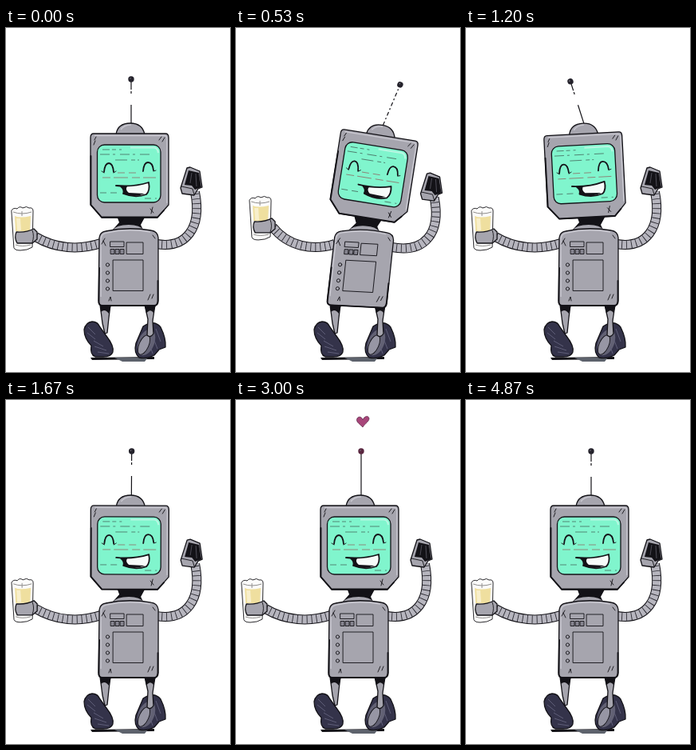
Write an HTML page that moves like this. It is 281x430 px and loops after 4.94 s.

```html
<!DOCTYPE html>
<html lang="en">
<head>
<meta charset="utf-8">
<title>Dancing robot</title>
<style>
@property --lean { syntax: "<number>"; inherits: true; initial-value: 0; }
@property --nod { syntax: "<number>"; inherits: true; initial-value: 0; }
@property --whip { syntax: "<number>"; inherits: true; initial-value: 0; }

html, body { margin: 0; width: 100%; height: 100%; overflow: hidden; background: #fff; }
svg {
  display: block; width: 100%; height: 100%;
  --ink: #131217; --metal: #a6a5ae; --light: #c9c8d0; --shade: #85848f; --navy: #34334a;
  animation: lean 4940ms ease-in-out infinite, nod 4940ms ease-in-out infinite, whip 4940ms ease-in-out infinite;
}
.ink { stroke: var(--ink); stroke-width: 1.3; stroke-linejoin: round; stroke-linecap: round; }
.metal { fill: var(--metal); }
.shade { fill: var(--shade); }
.black { fill: var(--ink); }
.line { fill: none; }
.thin { stroke-width: .9; }
.bold { stroke-width: 1.8; }
.glint { fill: none; stroke: var(--light); stroke-width: 1.4; }

.body {
  transform-origin: 152px 325px;
  transform: translateY(calc(var(--lean) * 1px)) rotate(calc(var(--lean) * 3deg)) skewX(calc(var(--lean) * -3deg));
}
.head {
  transform-origin: 155px 294px;
  transform: rotate(calc(var(--lean) * 9deg + var(--nod) * -3deg));
}
.antenna {
  transform-origin: 157px 119px;
  transform: rotate(calc(var(--whip) * 14deg));
}
.glass { transform: translate(calc(var(--lean) * 10px), calc(var(--lean) * -13px)); }
.fist { transform: translate(calc(var(--lean) * 12.5px), calc(var(--lean) * 7px)); }

.arm path { fill: none; }
.arm path:nth-child(1) { stroke: var(--ink); stroke-width: 12; }
.arm path:nth-child(2) { stroke: #b6b5be; stroke-width: 10; }
.arm path:nth-child(3) { stroke: #2b2a32; stroke-width: 10; stroke-dasharray: .9 5.1; }
.left path { d: path("M119 269C92 278 62 276 37 261"); animation: left 4940ms ease-in-out infinite; }
.right path { d: path("M189 270C226 276 246 250 237 205"); animation: right 4940ms ease-in-out infinite; }

.wire { stroke-width: 1.2; animation: wire 4940ms step-end infinite; }
.bulb { fill: #24222b; animation: bulb 4940ms linear infinite; }
.heart { opacity: 0; animation: rise 4940ms linear infinite; }

@keyframes lean {
  0%, 22.3%, 33%, 44.5%, 100% { --lean: 0; }
  9.3% { --lean: 1.03; }
  43%, 44.49% { --lean: 1; }
}
@keyframes nod {
  0%, 15%, 33%, 100% { --nod: 0; }
  23.5%, 25% { --nod: 1; }
}
@keyframes whip {
  0%, 33%, 44.5%, 100% { --whip: 0; }
  10.2%, 43%, 44.49% { --whip: 1; }
  24.3% { --whip: -1.06; }
}
@keyframes left {
  0%, 22.3%, 33%, 44.5%, 100% { d: path("M119 269C92 278 62 276 37 261"); }
  9.3%, 43%, 44.49% { d: path("M124 270C97 279 65 273 46 248"); }
}
@keyframes right {
  0%, 22.3%, 33%, 44.5%, 100% { d: path("M189 270C226 276 246 250 237 205"); }
  9.3%, 43%, 44.49% { d: path("M195 274C236 282 258 258 249 212"); }
}
@keyframes wire {
  0%, 72% { stroke-dasharray: 23 14 3 2 10; }
  5% { stroke-dasharray: 5 3 2 3; }
  17%, 44.5% { stroke-dasharray: 24 14 3 2 10; }
  50% { stroke-dasharray: none; }
}
@keyframes bulb {
  0%, 47%, 73%, 100% { fill: #24222b; }
  50%, 70% { fill: #59263f; }
}
@keyframes rise {
  0%, 47% { opacity: 0; transform: translate(157px, 63px) scale(.1); }
  50% { opacity: 1; transform: translate(157px, 51px) scale(.6); }
  54% { opacity: 1; transform: translate(158px, 39px) scale(.9); }
  60.7% { opacity: 1; transform: translate(159px, 27px) scale(1); }
  68% { opacity: .9; transform: translate(159px, 15px) scale(1); }
  72.5%, 100% { opacity: 0; transform: translate(159px, 8px) scale(1); }
}
</style>
</head>
<body>
<svg viewBox="0 0 281 430" preserveAspectRatio="none">
  <g class="feet">
    <path class="black" d="M106 412L186 411V414L108 415Z"/>
    <path d="M136 412H178L174 417H146Z" fill="#5d626c"/>
    <path class="ink" fill="var(--navy)" d="M98 377Q100 368 108 367Q115 367 118 374L126 385Q136 398 134 405Q132 411 122 411H112Q105 408 107 397Q98 388 98 377Z"/>
    <path class="line" stroke="#5f5e78" d="M103 374L112 383M102 381L112 389M110 391L122 398M111 398L126 403M115 405L129 407"/>
    <path class="ink" fill="var(--navy)" d="M172 373Q186 364 194 374Q201 388 200 399L192 402L186 409Q177 414 167 412Q160 406 163 394Z"/>
    <ellipse cx="176" cy="393" rx="10" ry="17" transform="rotate(22 176 393)" fill="#626174"/>
    <ellipse class="ink thin" cx="173" cy="396" rx="6" ry="13" transform="rotate(24 173 396)" fill="#9796a4"/>
    <path class="line" stroke="#5f5e78" d="M188 376L194 392M185 388L190 401M181 398L184 407"/>
    <path class="ink metal" d="M118 346L121 369L124 382L127 381L129 362L131 346Z"/>
    <path class="ink metal" d="M174 346L178 364L177 384Q181 388 185 382L184 366L187 346Z"/>
    <path class="black" d="M118 346H132L129 357Q124 350 119 355ZM174 346H188L185 356Q181 350 176 357Z"/>
  </g>

  <g class="arm left"><path/><path/><path/></g>
  <g class="arm right"><path/><path/><path/></g>

  <g class="body">
    <path class="black" d="M139 235H175L169 246L172 252H134L142 243Z"/>
    <path class="metal" d="M134 253Q138 246 154 246Q168 246 173 253Z"/>
    <path class="ink metal" d="M117 262Q118 255 125 254Q153 248 182 253Q190 254 191 262V341Q191 347 186 347H121Q116 347 116 341Z"/>
    <path class="glint" d="M119 336V263Q120 257 126 256Q153 250 181 255"/>
    <path class="ink bold line" d="M117 300L116.500 341Q116 347 121 347H186Q190 347 190.500 341V316"/>
    <g class="ink thin line">
      <rect x="131" y="267" width="17" height="6.500"/>
      <rect x="151.500" y="268" width="20.500" height="14.500"/>
      <path d="M131.500 276.500h4.500v6h-4.500zM137.500 276.500h4.500v6h-4.500zM143.500 276.500h4.500v6h-4.500z" class="shade"/>
      <rect x="134.500" y="290" width="37.500" height="38.500"/>
      <circle cx="127.500" cy="296" r="2.100"/>
      <circle cx="127.500" cy="306" r="2.100"/>
      <circle cx="127.500" cy="316" r="2.100"/>
      <circle cx="127.500" cy="326" r="2.100"/>
      <path d="M120 270L124 263M122 266L125 272M129 341L131 336L132 341M178 340L181 333M183 338L185 333M184 259L187 263"/>
    </g>
  </g>

  <g class="glass">
    <path class="ink thin" fill="#fbfbfa" d="M7 228Q9 224 14 226Q17 222 21 225Q26 222 29 225Q34 224 34 229L33 274Q27 278 18 278Q11 278 10 275Z"/>
    <path fill="#efdf9f" d="M11 235Q17 238 31 235L30 254H12Z"/>
    <path fill="#f8efcc" d="M13 238H18L19 253H14Z"/>
    <path class="line" stroke="#8f8d8c" d="M9 230Q20 234 32 230M20 229V235M12 271Q20 274 31 271"/>
    <path class="ink metal" d="M13 255Q25 256 35 251L39 255V264L33 269H14Q10 262 13 255Z"/>
    <path class="ink thin line" d="M33 253Q36 260 33 268"/>
  </g>

  <g class="fist">
    <path class="ink metal" d="M227 175L231 174L243 179L246 199L241 201L236 209L221 207L219 200Z"/>
    <path class="black" d="M229 178L242 181L245 199L237 202L233 197L224 196Z"/>
    <path class="line" stroke="#5c5b66" stroke-width=".8" d="M233 181L231 194M238 182L239 198"/>
    <path class="ink thin line" d="M220 198L234 201L236 208"/>
  </g>

  <g class="head">
    <g class="antenna">
      <path class="wire ink line" style="stroke-linecap:butt" d="M157 119V66"/>
      <circle class="bulb" cx="157" cy="64" r="3.700"/>
      <circle cx="156" cy="63" r=".8" fill="#77757f"/>
    </g>
    <path class="ink metal" d="M138 133Q140 119 156 119Q171 119 174 133Z"/>
    <path class="glint" d="M144 127Q148 121 157 121"/>
    <path class="ink metal" d="M110 132H200Q204 132 204 137V221L190 237H120L106 221V137Q106 132 110 132Z"/>
    <path class="glint" d="M111 134.500H199Q202 135 202 139V219"/>
    <path class="ink bold line" d="M106.500 160V221L120 236.500H190L198 228"/>
    <rect class="ink" x="114.500" y="146" width="79.500" height="72" rx="9" fill="#80f5cd"/>
    <path class="line" stroke="#b9f8e3" stroke-width="2" d="M156 149.500H186Q190 150 191 156"/>
    <g fill="none" stroke="#466a5e" stroke-width=".8">
      <path stroke-dasharray="9 3 5 4" d="M121 152H145"/>
      <path stroke-dasharray="12 4 3 6" d="M118 158H184"/>
      <path stroke-dasharray="15 5 5 3" d="M137 165H167"/>
      <path stroke="#8f7068" stroke-dasharray="10 4 18 5" d="M121 187H188"/>
      <path stroke="#8f7068" stroke-dasharray="9 5" d="M140 181H168"/>
      <path stroke-dasharray="8 5" d="M118 206H139M174 213H189"/>
    </g>
    <path class="ink bold line" d="M123 180Q124 169 129 169Q134 169 135 180M172 179Q173 168 178 168Q184 168 185 178"/>
    <path class="ink thin line" d="M120 179L123 181M135 181L138 179M185 179L188 178"/>
    <path class="ink bold" fill="#f6fbf9" d="M138 197Q160 199 179 193Q181 203 176 208Q162 213 147 207Q149 202 144 198"/>
    <path class="black" d="M143 197L152 198Q149 202 154 206L174 207Q160 213 147 207Q149 202 143 197Z"/>
    <path class="ink thin line" d="M111 140L113 136M110 146L112 141M192 140L195 136M196 142L199 137M181 226L185 231M184 224L182 232"/>
  </g>

  <path class="heart" fill="#a8467a" stroke="#5d2948" stroke-width=".8" d="M0 7C-5 2 -9 0 -7 -4C-5 -7 -1 -6 0 -2C2 -7 7 -8 8 -4C8 0 3 2 0 7Z"/>
</svg>
</body>
</html>
```
